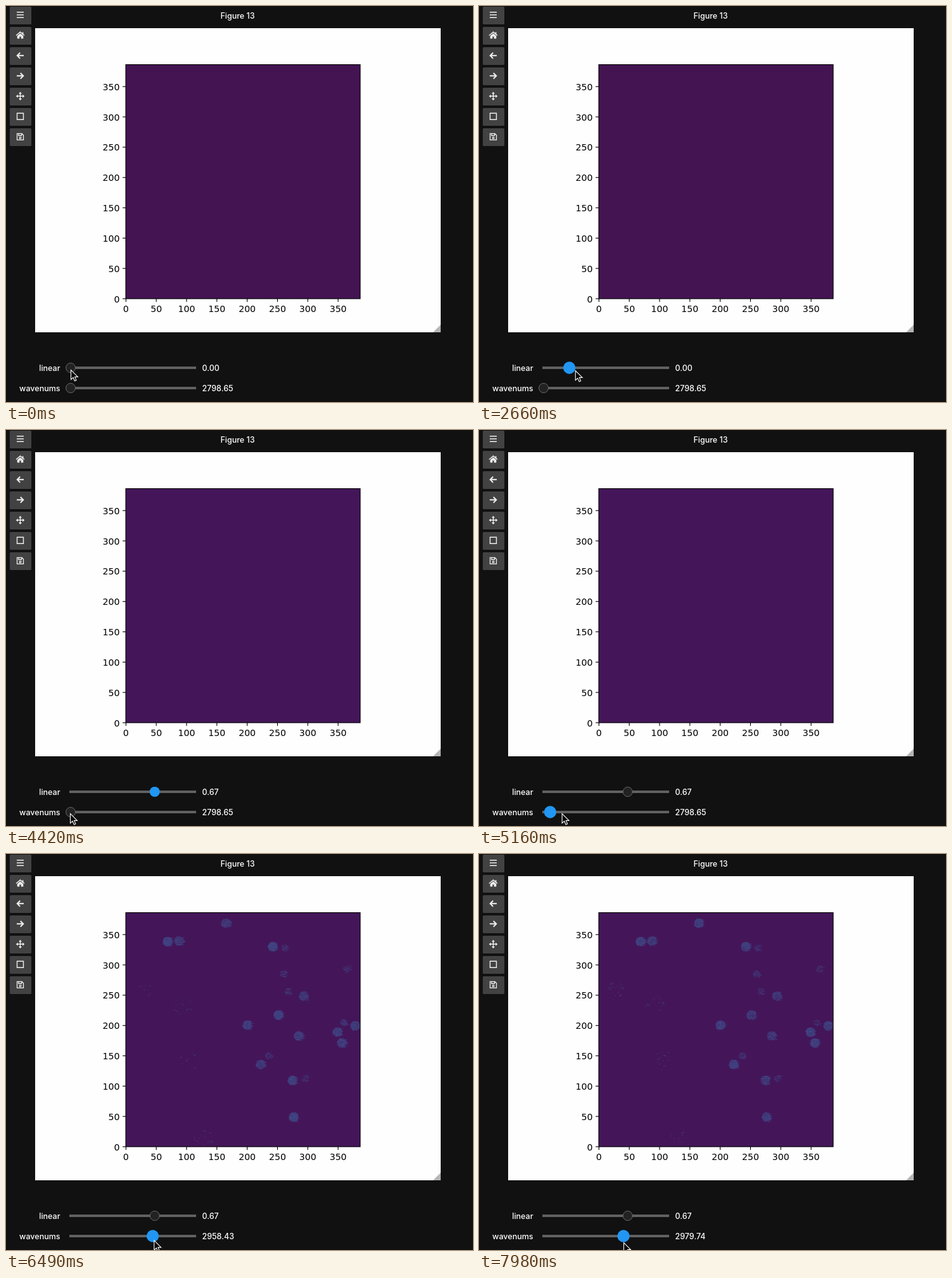
These frames come from a looping animation (737 by 625 pixels, 8 s). An HTML page with a canvas:

```html
<!DOCTYPE html>
<html lang="en">
<head>
<meta charset="utf-8">
<title>Figure 13</title>
<style>
  html, body { margin: 0; width: 100%; height: 100%; overflow: hidden; background: #111; }
  canvas { display: block; }
</style>
</head>
<body>
<canvas id="stage" width="737" height="625"></canvas>
<script>
const ctx = document.getElementById('stage').getContext('2d');
const LOOP = 8000, STEP = 147.6;
const UI_FONT = '500 12.5px Inter, sans-serif';
const PLOT_FONT = '14.1px "DejaVu Sans", sans-serif';

// Spot centres by kind; near and far are strengths below and above wave index 17.5.
const spotKinds = [
  { r: 8, near: .95, far: .75, centres: [[347, 109], [255, 138], [273, 137], [421, 146], [470, 224],
    [430, 254], [381, 270], [462, 287], [402, 332], [452, 357], [454, 415], [523, 281], [551, 271], [530, 298]] },
  { r: 6, near: .55, far: .4, centres: [[440, 148], [438, 189], [445, 217], [538, 181], [533, 266],
    [415, 318], [472, 354]] },
  { r: 15, near: .06, far: .08, centres: [[278, 238], [215, 215], [290, 326], [312, 450]] }
];

const icons = [
  { line: 'M-5.5-4.5H5.5M-5.5-.3H5.5M-5.5 4H5.5', width: 1.6 },
  { line: 'M-6.5 .2L0-5.2 6.5 .2', fill: 'M0-3L4.8 1V5.3H1.2V2H-1.2V5.3H-4.8V1ZM3.2-5H4.9V-1H3.2Z', width: 1.5 },
  { line: 'M-4.5 0H5.5M-.3-4.6L-4.8 0-.3 4.6', width: 2 },
  { line: 'M4.5 0H-5.5M.3-4.6L4.8 0 .3 4.6', width: 2 },
  { line: 'M-5 0H5M0-5V5', fill: 'M0-6.8L2.6-3.8H-2.6ZM0 6.8L2.6 3.8H-2.6ZM-6.8 0L-3.8-2.6V2.6ZM6.8 0L3.8-2.6V2.6Z', width: 1.5 },
  { line: 'M-5-5H5V5H-5Z', width: 1.4 },
  { line: 'M-5-5H2.6L5-2.6V5H-5ZM-2.7-5V-1.8H2V-5M1.4 2A1.4 1.4 0 1 1-1.4 2 1.4 1.4 0 1 1 1.4 2', width: 1.3 }
].map(({ line, fill, width }) => ({ line: new Path2D(line), fill: new Path2D(fill || ''), width }));
const arrow = new Path2D('M.5.5V15.6L4 12.3 6.4 17.8 8.9 16.7 6.6 11.4H11.4Z');

const clamp01 = v => Math.max(0, Math.min(1, v));

// Adds up moves of [first step, last step, distance], each easing out.
const glide = (step, start, ...moves) => moves.reduce((sum, [from, to, distance]) =>
  sum + distance * (1 - (1 - clamp01((step - from) / (to - from))) ** 2), start);

const linearKnob = step => glide(step, 102, [16.2, 27, 132.7]);
const waveKnob = step => glide(step, 102, [34.5, 48, 142], [50, 54, -16]);
// The pointer runs slightly ahead of the knob it drags.
const cursorX = step => glide(step, 102, [7, 10, 47], [10, 13, -47],
  [15.7, 27, 136], [27, 30, -137], [33.4, 48, 143], [50, 54, -16]);
const cursorY = step => glide(step, 574, [0, 4, -3], [15.7, 27, 11], [27, 30, 23], [39, 54, 8]);

function randomFrom(seed) {
  return () => {
    seed = (seed + 0x6d2b79f5) | 0;
    let v = Math.imul(seed ^ seed >>> 15, 1 | seed);
    v = v + Math.imul(v ^ v >>> 7, 61 | v) ^ v;
    return ((v ^ v >>> 14) >>> 0) / 4294967296;
  };
}

function rect(color, x, y, w, h) {
  ctx.fillStyle = color;
  ctx.fillRect(x, y, w, h);
}

function disc(x, y, r) {
  ctx.beginPath();
  ctx.arc(x, y, r, 0, 2 * Math.PI);
  ctx.fill();
}

function text(string, x, y, align, font = UI_FONT, color = '#fff') {
  ctx.font = font;
  ctx.textAlign = align;
  ctx.fillStyle = color;
  ctx.fillText(string, x, y);
}

function drawToolbar() {
  icons.forEach(({ line, fill, width }, i) => {
    ctx.fillStyle = '#424242';
    ctx.beginPath();
    ctx.roundRect(6, 1 + 32 * i, 34, 28, 1.5);
    ctx.fill();
    ctx.save();
    ctx.translate(22.5, 14.3 + 32 * i);
    ctx.strokeStyle = ctx.fillStyle = '#eee';
    ctx.lineWidth = width;
    ctx.stroke(line);
    ctx.fill(fill);
    ctx.restore();
  });
}

// A soft disc crossed by short random streaks.
function drawSpot(cx, cy, r, strength, random) {
  ctx.globalAlpha = .5 * strength ** 2;
  disc(cx, cy, r - .7);
  for (let y = -r; y <= r; y++) {
    const half = Math.sqrt(r * r - y * y);
    const row = .6 + .5 * random();
    for (let x = -half, w; x < half; x += w) {
      w = 1 + Math.floor(random() * 3);
      ctx.globalAlpha = .15 + .4 * random();
      if (random() < strength * row) ctx.fillRect(Math.round(cx + x), cy + y, w, 1);
    }
  }
}

function drawSpots(index) {
  const rise = clamp01((index - 9) / 6);
  if (!rise) return;
  const random = randomFrom(index * 977);
  ctx.save();
  ctx.beginPath();
  ctx.rect(189, 93, 370, 369);
  ctx.clip();
  ctx.fillStyle = '#3e5693';
  for (const { r, near, far, centres } of spotKinds) {
    const strength = index > 17 ? far : near * rise;
    for (const [x, y] of centres) drawSpot(x, y, r, strength * (.8 + .3 * random()), random);
  }
  ctx.restore();
}

function drawFigure(linear, index) {
  rect('#fefefe', 46, 35, 640, 480);
  ctx.fillStyle = '#b4b4b4';
  ctx.beginPath();
  ctx.moveTo(686, 503);
  ctx.lineTo(686, 515);
  ctx.lineTo(674, 515);
  ctx.fill();

  rect(`rgb(68, ${19.5 + 3 * linear}, ${82 + 11 * linear})`, 189, 92, 370, 370);
  drawSpots(index);
  ctx.strokeStyle = '#000';
  ctx.lineWidth = 1.1;
  ctx.strokeRect(189, 92.5, 370, 369.5);
  for (let i = 0; i < 8; i++) {
    const x = 189.3 + 47.83 * i, y = 462 - 47.83 * i;
    rect('#000', x - .55, 462, 1.1, 5);
    rect('#000', 184, y - .55, 5, 1.1);
    text(50 * i, x, 483, 'center', PLOT_FONT, '#000');
    text(50 * i, 179.5, y + 5.5, 'right', PLOT_FONT, '#000');
  }
}

// mode: 0 idle, 1 focused, 2 dragging
function drawSlider(label, y, knob, value, mode) {
  text(label, 85.5, y + 4.8, 'right');
  text(value, 309.5, y + 4.8, 'left');
  rect('#616161', 100, y - 2, 200, 4);
  ctx.fillStyle = mode ? '#2196f3' : '#222';
  disc(knob, y, [7.5, 8, 9.7][mode]);
  if (!mode) {
    ctx.strokeStyle = '#686868';
    ctx.lineWidth = 1;
    ctx.stroke();
  }
}

function drawCursor(x, y) {
  ctx.save();
  ctx.translate(x, y);
  ctx.fillStyle = '#000';
  ctx.fill(arrow);
  ctx.strokeStyle = '#fff';
  ctx.lineWidth = 1.1;
  ctx.stroke(arrow);
  ctx.restore();
}

function draw(now) {
  const step = Math.floor((now % LOOP + 10) / STEP);
  // Readouts trail the knobs by two steps.
  const linear = (linearKnob(step - 2) - 102) / 198;
  const index = Math.round((waveKnob(step - 2) - 102) / 7.6);
  const linearMode = step < 15 || step > 32 ? 0 : step < 27 ? 2 : 1;

  rect('#111', 0, 0, 737, 625);
  text('Figure 13', 365.5, 20, 'center');
  drawToolbar();
  drawFigure(linear, index);
  drawSlider('linear', 571, linearKnob(step), linear.toFixed(2), linearMode);
  drawSlider('wavenums', 603, waveKnob(step), (2798.654 + 10.652 * index).toFixed(2), step < 33 ? 0 : 2);
  drawCursor(cursorX(step), cursorY(step));
}

function tick() {
  draw(performance.now());
  requestAnimationFrame(tick);
}
tick();
</script>
</body>
</html>
```
